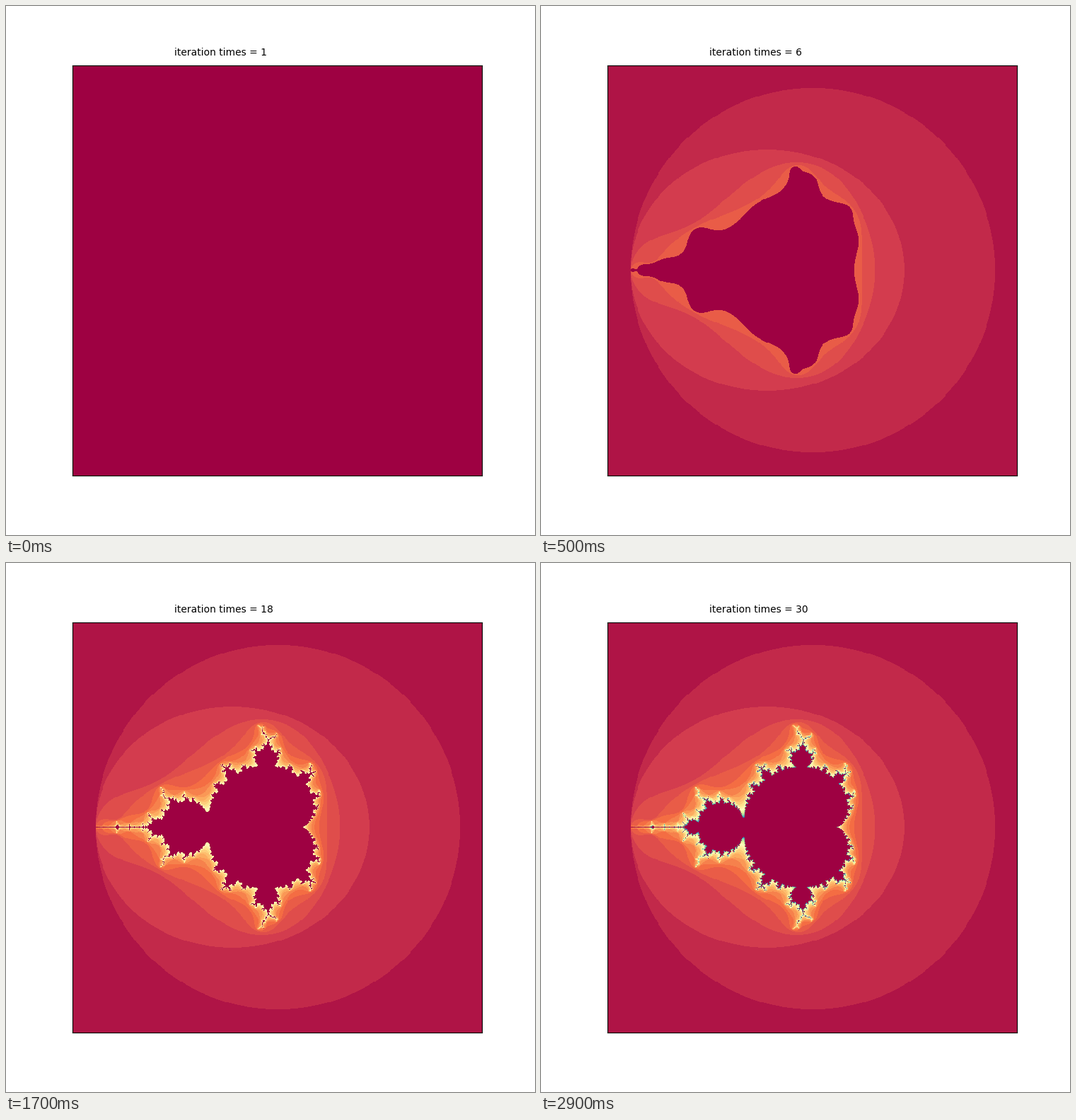
Recreate the animation shown at these times as a matplotlib script. Size 748x748 px, loop 3000 ms.

```python
import numpy as np
import matplotlib.pyplot as plt
from matplotlib.animation import FuncAnimation

SIZE, DPI = 748, 100
STEPS = 30          # one more iteration per frame
GRID = 600
HALF_WIDTH = 2.25


def escape_times(grid, steps):
    """First k with |z_k| > 2 under z -> z^2 + c, or 0 if z stays bounded."""
    axis = (np.arange(grid) - grid // 2) * (2 * HALF_WIDTH / grid)
    c = axis[None, :] + 1j * axis[:, None]
    z = np.zeros_like(c)
    times = np.zeros(c.shape, dtype=int)
    for k in range(1, steps):
        alive = times == 0
        z[alive] = z[alive] ** 2 + c[alive]
        times[alive & (np.abs(z) > 2)] = k
    return times


times = escape_times(GRID, STEPS)

plt.rcParams["font.family"] = "DejaVu Sans"
fig = plt.figure(figsize=(SIZE / DPI, SIZE / DPI), dpi=DPI, facecolor="white")
ax = fig.add_axes([0.125, 0.1125, 0.775, 0.775])
ax.set_xticks([])
ax.set_yticks([])

image = ax.imshow(np.zeros_like(times), cmap="Spectral", vmin=0, vmax=STEPS,
                  origin="lower", interpolation="nearest", aspect="auto")
label = ax.text(0.25, 1.0245, "", transform=ax.transAxes, fontsize=10,
                color="black", ha="left", va="baseline")


def draw(frame):
    count = frame + 1
    image.set_data(np.where(times < count, times, 0))
    label.set_text(f"iteration times = {count}")
    return image, label


anim = FuncAnimation(fig, draw, frames=STEPS, interval=100,
                     repeat=True, repeat_delay=0, blit=False)

plt.show()
```
